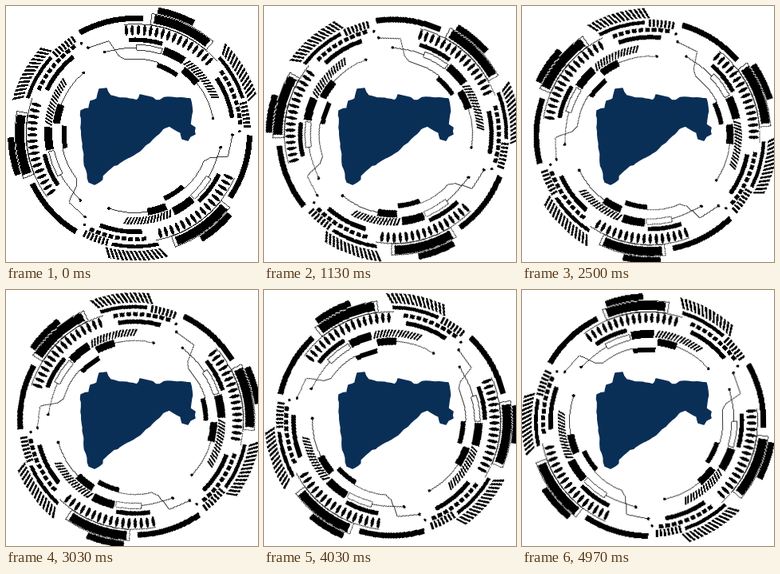
These frames come from a looping animation (316x320 px, 5010 ms). An HTML page:

```html
<!DOCTYPE html>
<html lang="en">
<head>
<meta charset="utf-8">
<title>Map in a turning ring</title>
<style>
  html, body { margin: 0; width: 100%; height: 100%; overflow: hidden; background: #fff; }
  svg { display: block; width: 100%; height: 100%; }
  /* The ring turns about the stage centre, slightly off its own centre. */
  #ring { transform-origin: 158px 160px; animation: turn 5.01s linear infinite; shape-rendering: crispEdges; }
  @keyframes turn { to { transform: rotate(90deg); } }
  #lines { fill: none; stroke: #000; stroke-width: .8; }
  #map { fill: #0a2f57; stroke: #0a2f57; stroke-width: 1.5; stroke-linejoin: round; }
</style>
</head>
<body>
<svg viewBox="0 0 316 320">
  <defs>
    <g id="sector">
      <path id="solid"/>
      <path id="lines"/>
    </g>
  </defs>
  <g id="ring">
    <g transform="translate(162 159)">
      <use href="#sector"/>
      <use href="#sector" transform="rotate(120)"/>
      <use href="#sector" transform="rotate(240)"/>
    </g>
  </g>
  <path id="map"/>
</svg>
<script>
  // Ring parts use radius and degrees clockwise from twelve o'clock.
  let solid = '', lines = '';

  const pt = (r, a) => {
    const t = a * Math.PI / 180;
    return (r * Math.sin(t)).toFixed(2) + ' ' + (-r * Math.cos(t)).toFixed(2);
  };
  const arc = (r, a, sweep = 1) => `A${r} ${r} 0 0 ${sweep} ${pt(r, a)}`;

  // skew shifts the inner edge clockwise
  const band = (r, depth, from, to, skew = 0) =>
    `M${pt(r + depth, from)}${arc(r + depth, to)}L${pt(r, to + skew)}${arc(r, from + skew, 0)}Z`;
  const bar = (...b) => { solid += band(...b); };
  const box = (...b) => { lines += band(...b); };
  const row = (r, depth, from, to, step, skew = 0, fill = .55) => {
    for (let a = from; a < to; a += step) bar(r, depth, a, a + step * fill, skew);
  };
  const oval = (r, a, rx, ry) => {
    const half = `A${rx} ${ry} ${a} 0 1 `;
    solid += `M${pt(r - ry, a)}${half}${pt(r + ry, a)}${half}${pt(r - ry, a)}Z`;
  };
  const dot = (r, a) => oval(r, a, 1.8, 1.8);
  const thin = (r, from, to) => { lines += `M${pt(r, from)}${arc(r, to)}`; };

  // Outer rim: long arc, stepped block, slanted hatching
  bar(140, 7, -29, 4);
  bar(139, 11, 9.5, 39);
  bar(152, 8, 10.5, 28);
  box(137, 14, 8, 40.5);
  row(147, 12.5, 45, 73, 2, 2.6);
  bar(139.5, 4.5, 48, 72);
  row(136, 9, 74, 87, 2);

  // Middle: ladder of ovals, then dashes and a bar
  for (let a = -5; a < 48; a += 3.4) oval(129, a, 2.1, 6.5);
  thin(136.5, -6, 49);
  row(130, 5, 54, 86, 3.6, 0, .7);
  bar(120.5, 5.5, 56, 81);

  // Inner steps
  bar(114, 5.5, -4, 17);
  bar(104, 10, 19, 34);
  bar(95, 9, 37, 51);
  bar(86.5, 6, 18, 36);
  row(105, 9, 37, 68, 2.1, -2.2);
  box(104, 7, 1, 18);

  // Circuit traces with end dots
  lines += `M${pt(122, -29)}L${pt(120, -16)}L${pt(99, -12)}L${pt(93, -8)}${arc(93, 18)}`;
  lines += `M${pt(108.5, -20.7)}L${pt(107, -11)}${arc(107, 1)}`;
  thin(99.5, 51, 79.3);
  dot(122, -29);
  dot(131, -31);
  dot(108.5, -20.7);
  dot(99.5, 79.3);

  // Coast and borders: key corners, roughened between them
  let seed = 7;
  const rand = () => (seed = seed * 16807 % 2147483647) / 2147483647 - .5;
  const corners = `94,131 104,128 106,119 114,116 117,104 126,103 131,112 146,115 164,118
    168,111 177,113 188,118 203,114 214,115 231,116 233,126 231,148 237,152 237,160 231,163
    228,168 221,166 219,158 205,150 194,157 184,166 168,181 152,190 131,203 121,212 118,219
    111,223 104,220 98,195 94,152`.trim().split(/\s+/).map(p => p.split(',').map(Number));

  const coast = corners.flatMap(([x, y], i) => {
    const [nx, ny] = corners[(i + 1) % corners.length];
    const parts = Math.max(1, Math.round(Math.hypot(nx - x, ny - y) / 5));
    return Array.from({ length: parts }, (_, k) => {
      const rough = k ? 2.4 : 0;
      return [x + (nx - x) * k / parts + rough * rand(), y + (ny - y) * k / parts + rough * rand()];
    });
  });

  const draw = (id, d) => document.getElementById(id).setAttribute('d', d);
  draw('solid', solid);
  draw('lines', lines);
  draw('map', 'M' + coast.map(p => p.map(v => v.toFixed(1)).join(' ')).join('L') + 'Z');
</script>
</body>
</html>
```
